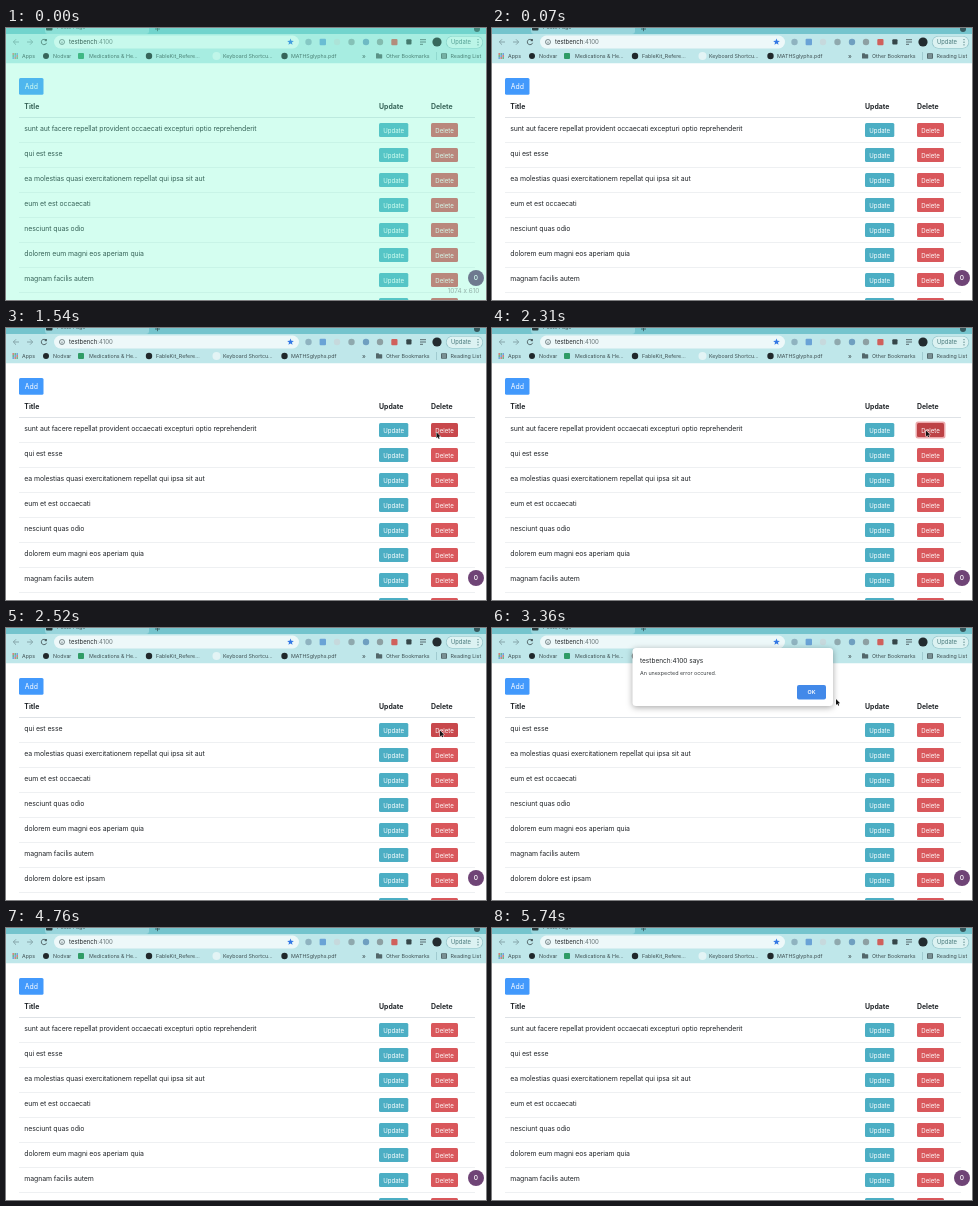
Animation, 480 px wide and 272 px high, one loop 5810 ms. Source, as an HTML page with a canvas:

```html
<!DOCTYPE html>
<html lang="en">
<head>
<meta charset="utf-8">
<title>Delete with rollback</title>
<style>
html, body { margin: 0; width: 100%; height: 100%; overflow: hidden; background: #fff; }
canvas { display: block; width: 480px; height: 272px; }
</style>
</head>
<body>
<canvas id="stage" width="480" height="272"></canvas>
<script>
const ctx = document.getElementById('stage').getContext('2d');
const LOOP = 5810, STEP = 70;
const HOST = 'testbench', PORT = ':4100';
const ROW_TOP = 89.6, ROW_HEIGHT = 25;
const DELETE_BOX = { x: 425, y: 95, w: 27, h: 14 };
const TIMES = { press: 2030, remove: 2380, alert: 2940, dismiss: 4130, settle: 4410 };
const TITLES = [
  'sunt aut facere repellat provident occaecati excepturi optio reprehenderit',
  'qui est esse',
  'ea molestias quasi exercitationem repellat qui ipsa sit aut',
  'eum et est occaecati',
  'nesciunt quas odio',
  'dolorem eum magni eos aperiam quia',
  'magnam facilis autem',
  'dolorem dolore est ipsam',
  'nesciunt iure omnis dolorem'
];

// Pointer path: time, x, y
const PATH = [
  [350, 482, 276], [840, 425, 109], [910, 424, 106], [1260, 425, 107],
  [1750, 434, 102.5], [2940, 434, 102.5], [3360, 344, 71],
  [3640, 342, 70], [4060, 324, 64.5], [4270, 324, 64.5], [4800, 400, -12]
];

const clamp = v => Math.max(0, Math.min(1, v));

function pointerAt(t) {
  const next = PATH.findIndex(p => p[0] > t);
  if (next < 1) return null;
  const [t0, x0, y0] = PATH[next - 1], [t1, x1, y1] = PATH[next];
  const u = (t - t0) / (t1 - t0), k = u * u * (3 - 2 * u);
  return { x: x0 + (x1 - x0) * k, y: y0 + (y1 - y0) * k };
}

function text(str, x, y, size, color, { weight = 400, align = 'left', spacing = 0 } = {}) {
  ctx.font = `${weight} ${size}px Inter, Roboto, sans-serif`;
  ctx.letterSpacing = spacing + 'px';
  ctx.textAlign = align;
  ctx.textBaseline = 'alphabetic';
  ctx.fillStyle = color;
  ctx.fillText(str, x, y + size * 0.36);
}

function rect(x, y, w, h, color, radius = 0) {
  ctx.fillStyle = color;
  ctx.beginPath();
  ctx.roundRect(x, y, w, h, radius);
  ctx.fill();
}

function disc(x, y, r, color) {
  ctx.fillStyle = color;
  ctx.beginPath();
  ctx.arc(x, y, r, 0, Math.PI * 2);
  ctx.fill();
}

function line(points, color, width = 0.9) {
  ctx.strokeStyle = color;
  ctx.lineWidth = width;
  ctx.beginPath();
  points.forEach(([x, y]) => ctx.lineTo(x, y));
  ctx.stroke();
}

function button(label, x, y, w, h, color, size) {
  rect(x, y, w, h, color, 1.5);
  text(label, x + w / 2, y + h / 2 + 0.4, size, '#fff', { align: 'center' });
}

function drawTabs() {
  rect(0, 0, 480, 35.3, '#bfe7ea');
  rect(0, 0, 480, 6, '#74c4cd');
  rect(39, -4, 104, 10, '#98d5dc', 3);
  rect(40, -2, 6.5, 4.4, '#26383b', 1);
  text('Posts Page', 51, -1, 5.4, '#45595c');
  line([[149, 1], [154, 1]], '#35565b', 0.8);
  line([[151.5, -1], [151.5, 3.2]], '#35565b', 0.8);
  disc(471, 1, 3, '#35565b');
}

function drawToolbar() {
  const ink = '#4c5d60', faint = '#7f9ea2';
  line([[13, 14], [7.5, 14]], faint);
  line([[10, 11.3], [7.3, 14], [10, 16.7]], faint);
  line([[21, 14], [26.5, 14]], faint);
  line([[24, 11.3], [26.7, 14], [24, 16.7]], faint);
  ctx.strokeStyle = ink;
  ctx.lineWidth = 0.9;
  ctx.beginPath();
  ctx.arc(38, 14, 2.7, 0.3, 5.5);
  ctx.stroke();
  rect(38.7, 11, 2.2, 2.2, ink);

  rect(48, 7.5, 245, 13, '#edf8f9', 6.5);
  ctx.strokeStyle = ink;
  ctx.lineWidth = 0.7;
  ctx.beginPath();
  ctx.arc(56, 14, 2.5, 0, Math.PI * 2);
  ctx.stroke();
  line([[56, 13.5], [56, 15.5]], ink, 0.7);
  text(HOST, 63, 14, 6, '#25292c');
  const hostWidth = ctx.measureText(HOST).width;
  text(PORT, 63 + hostWidth, 14, 6, '#6b777a');

  ctx.fillStyle = '#3478e5';
  ctx.beginPath();
  for (let i = 0; i < 10; i++) {
    const r = i % 2 ? 1.5 : 3.5, a = i * Math.PI / 5 - Math.PI / 2;
    ctx.lineTo(284.5 + r * Math.cos(a), 14 + r * Math.sin(a));
  }
  ctx.fill();

  disc(302.5, 14, 3.2, '#8fb3c0');
  rect(313.6, 10.8, 6.4, 6.4, '#6aa3d6', 1);
  disc(331, 14, 3.2, '#c6d9dd');
  disc(345.5, 14, 3.2, '#8fa9ae');
  disc(360, 14, 3.2, '#6f9fc0');
  disc(374, 14, 3.2, '#8da0a3');
  rect(385.3, 11, 6.2, 6.2, '#d0605c', 1);
  rect(400.3, 11.3, 5.2, 5.2, '#364649', 1);
  [11.7, 14, 16.3].forEach(y => line([[414, y], [y > 16 ? 417 : 420, y]], ink));
  disc(431, 14, 4.6, '#222b2f');

  rect(440, 8, 37, 12.5, '#8dbfc5', 6.3);
  rect(440.6, 8.6, 35.8, 11.3, '#dcf2f2', 5.7);
  text('Update', 445, 14.2, 5.8, '#47787a');
  [11.6, 14.2, 16.8].forEach(y => disc(472, y, 0.65, '#47787a'));
}

function drawBookmarks() {
  const ink = '#3f5053', y = 28;
  const label = (str, x) => text(str, x, y + 0.2, 5.3, ink);
  const appColors = ['#d65349', '#4a9d64', '#4a84d4'];
  for (let i = 0; i < 9; i++) {
    rect(6.5 + i % 3 * 2, 25.3 + Math.floor(i / 3) * 2, 1.4, 1.4, appColors[(i + Math.floor(i / 3)) % 3]);
  }
  label('Apps', 16);
  disc(40, y, 3, '#20282b');
  label('Nodvar', 47);
  rect(72, 25, 6, 6, '#2f9c66', 1);
  label('Medications & He...', 83);
  disc(143, y, 3.2, '#20282b');
  label('FableKit_Refere...', 150);
  disc(210.5, y, 4, '#e3f4f5');
  label('Keyboard Shortcu...', 217);
  disc(278.5, y, 3.2, '#20282b');
  label('MATHSglyphs.pdf', 285);
  text('»', 358, y, 6.5, ink, { align: 'center' });
  rect(370, 25.3, 3, 2, '#53676a', 0.5);
  rect(370, 26.2, 6.2, 4.4, '#53676a', 0.6);
  label('Other Bookmarks', 380);
  line([[430.5, 24], [430.5, 32]], '#92bfc4', 0.7);
  rect(435, 25.3, 6, 5.5, '#53676a', 0.7);
  [27, 29].forEach(v => line([[436, v], [440, v]], '#d5eff0', 0.6));
  label('Reading List', 444.5);
}

function deleteColor(row, t, pointer) {
  if (row === 0) {
    if (t >= TIMES.press && t < TIMES.remove) return '#bd4246';
    const b = DELETE_BOX;
    const over = pointer && pointer.x > b.x && pointer.x < b.x + b.w &&
      pointer.y > b.y && pointer.y < b.y + b.h;
    if (over) return '#c8484c';
  }
  if (row === 1 && t >= TIMES.dismiss && t < TIMES.settle) return '#c8484c';
  return '#d9575b';
}

function drawTable(t, pointer) {
  const ink = '#212529', body = { spacing: -0.08 }, bold = { weight: 700 };
  button('Add', 13, 50, 24.5, 16.7, '#4299fc', 6.9);
  text('Title', 18.3, 78.2, 6.9, ink, bold);
  text('Update', 373, 78.2, 6.9, ink, bold);
  text('Delete', 425, 78.2, 6.9, ink, bold);
  rect(13, 89, 456, 0.9, '#dee2e6');

  const removed = t >= TIMES.remove && t < TIMES.dismiss;
  const titles = removed ? TITLES.slice(1) : TITLES;
  const b = DELETE_BOX;
  titles.slice(0, 8).forEach((title, row) => {
    const top = ROW_TOP + row * ROW_HEIGHT, y = b.y + row * ROW_HEIGHT;
    if (row) rect(13, top - 0.2, 456, 0.5, '#dee2e6');
    text(title, 18.3, top + 11, 6.9, ink, body);
    button('Update', 373, y, 29.3, b.h, '#4caec4', 6.1);
    if (row === 0 && t >= TIMES.press && t < TIMES.remove) {
      rect(b.x - 1.5, y - 1.5, b.w + 3, b.h + 3, '#ecaaad', 2.5);
    }
    button('Delete', b.x, y, b.w, b.h, deleteColor(row, t, pointer), 6.1);
  });

  disc(470, 250, 8, '#6f4476');
  text('0', 470, 250, 6.6, '#fff', { align: 'center', weight: 500 });
}

function drawAlert(t) {
  const closing = t >= TIMES.dismiss;
  const alpha = closing ? clamp(1 - (t - TIMES.dismiss) / 110) : clamp((t - TIMES.alert) / 210);
  if (!alpha) return;
  const away = (1 - alpha) / 0.64, scale = 1 - 0.03 * away;
  ctx.save();
  ctx.globalAlpha = alpha;
  ctx.translate(240.5, 45 - 5.5 * away);
  ctx.scale(scale, scale);
  ctx.translate(-240.5, -45);
  // The shadow fades faster than the panel so it never shows through it
  ctx.shadowColor = `rgba(0,0,0,${0.35 * alpha ** 3})`;
  ctx.shadowBlur = 6;
  ctx.shadowOffsetY = 1.5;
  rect(140.5, 20, 200.5, 58, '#fff', 3.5);
  ctx.shadowColor = 'transparent';
  text(`${HOST}${PORT} says`, 148, 32.2, 6.5, '#25292c');
  text('An unexpected error occured.', 148, 45.3, 5.4, '#3c4043');
  rect(305, 57, 29, 14.4, '#4289e9', 2);
  text('OK', 319.5, 64.3, 5.4, '#fff', { align: 'center', weight: 600 });
  ctx.restore();
}

function drawPointer({ x, y }) {
  ctx.save();
  ctx.translate(x, y);
  ctx.scale(0.9, 0.9);
  ctx.beginPath();
  [[0, 0], [0, 6.6], [1.5, 5.2], [2.5, 7.4], [3.5, 7], [2.6, 4.8], [4.6, 4.7]]
    .forEach(([px, py]) => ctx.lineTo(px, py));
  ctx.closePath();
  ctx.strokeStyle = '#fff';
  ctx.lineWidth = 1.1;
  ctx.stroke();
  ctx.fillStyle = '#111';
  ctx.fill();
  ctx.restore();
}

function drawSelection() {
  rect(0, 0, 480, 272, 'rgba(107,250,203,.29)');
  text('1074 x 610', 457.5, 263, 6.4, '#96b3ab', { align: 'center' });
}

function draw(t) {
  const pointer = pointerAt(t);
  rect(0, 0, 480, 272, '#fff');
  drawTabs();
  drawToolbar();
  drawBookmarks();
  drawTable(t, pointer);
  drawAlert(t);
  if (pointer) drawPointer(pointer);
  if (t < STEP) drawSelection();
}

const start = performance.now();
function tick() {
  const t = (performance.now() - start) % LOOP;
  draw(Math.floor(t / STEP) * STEP);
  requestAnimationFrame(tick);
}
tick();
</script>
</body>
</html>
```
